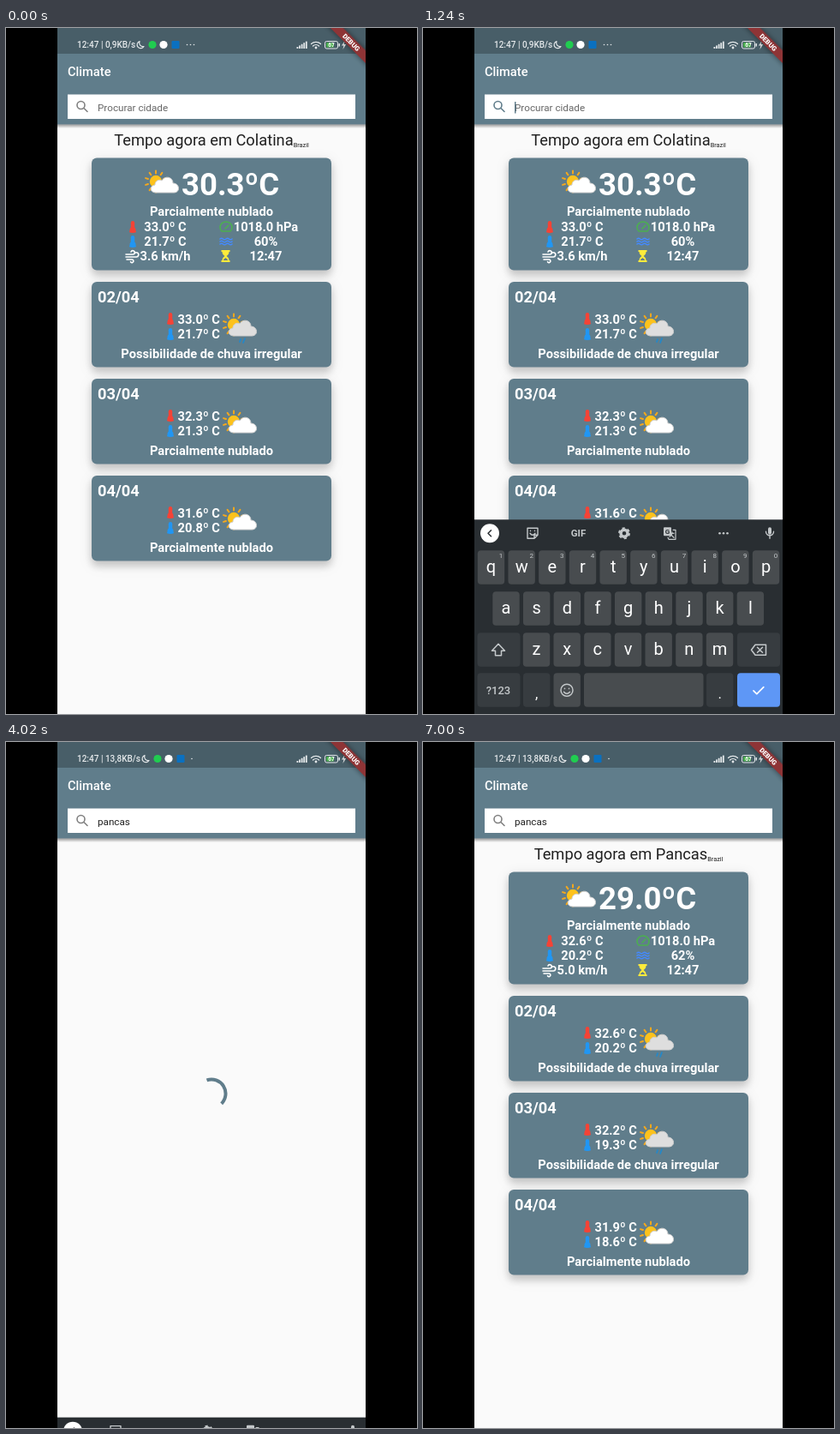
An HTML page that plays this animation: 480 px wide and 800 px high, repeating every 7050 ms.

```html
<!DOCTYPE html>
<html lang="pt">
<head>
<meta charset="utf-8">
<title>Climate</title>
<style>
html, body { margin: 0; width: 100%; height: 100%; overflow: hidden; background: #000; }
svg { display: block; width: 480px; height: 800px; font-family: Roboto, sans-serif; }
text { white-space: pre; }
.card { fill: #607d8b; filter: drop-shadow(0 6px 5px rgba(0, 0, 0, .16)) drop-shadow(0 3px 7px rgba(0, 0, 0, .1)); }
.bold { fill: #fff; font-weight: 700; font-size: 14.66px; }
.mid { text-anchor: middle; }
.line { fill: none; stroke-linecap: round; stroke-linejoin: round; }
.key { font-size: 20px; fill: #fff; text-anchor: middle; }
</style>
</head>
<body>
<svg viewBox="0 0 480 800">
  <defs>
    <clipPath id="phone"><rect x="60" width="360" height="800"/></clipPath>
    <linearGradient id="barShade" x2="0" y2="1">
      <stop stop-opacity=".38"/><stop offset="1" stop-opacity="0"/>
    </linearGradient>
  </defs>
  <rect width="480" height="800"/>
  <g clip-path="url(#phone)">
    <rect x="60" width="360" height="800" fill="#fafafa"/>
    <g id="body"></g>
    <g id="spinner"><path class="line" stroke="#607d8b" stroke-width="4" style="stroke-linecap:butt"/></g>
    <rect x="60" y="30" width="360" height="82.5" fill="#607d8b"/>
    <rect x="60" y="112.5" width="360" height="4.5" fill="url(#barShade)"/>
    <rect x="60" width="360" height="30" fill="#485e68"/>
    <text x="72" y="56" font-size="14.66" font-weight="500" fill="#fff">Climate</text>
    <rect x="72" y="77.5" width="336" height="28.5" fill="#fff"/>
    <g id="search"></g>
    <g id="status"></g>
    <g id="keyboard"></g>
    <g transform="translate(420 0) rotate(45)">
      <rect x="-50" y="18.5" width="100" height="10.5" fill="#8e3436" style="filter:drop-shadow(0 0 3px rgba(0,0,0,.5))"/>
      <text class="mid" y="26.5" font-size="7.8" font-weight="900" fill="#fff">DEBUG</text>
    </g>
  </g>
</svg>
<script>
const LOOP = 7050;
const FOCUS = 850, KEYS_IN = 1000, SUBMIT = 3860, LOADING = 3900, LOADED = 4500;
const QUERY = 'pancas';
const FIRST_PRESS = 2400, PRESS_EVERY = 200, PRESS_HOLD = 110;
const KEYS_HEIGHT = 227;
const RAIN = 'Possibilidade de chuva irregular', CLOUDY = 'Parcialmente nublado';
const RED = '#f44336', BLUE = '#2196f3', PRIMARY = '#607d8b';

const PLACES = {
  colatina: {
    city: 'Colatina', temp: '30.3', max: '33.0', min: '21.7', wind: '3.6', humidity: '60',
    days: [['33.0', '21.7', RAIN], ['32.3', '21.3', CLOUDY], ['31.6', '20.8', CLOUDY]]
  },
  pancas: {
    city: 'Pancas', temp: '29.0', max: '32.6', min: '20.2', wind: '5.0', humidity: '62',
    days: [['32.6', '20.2', RAIN], ['32.2', '19.3', RAIN], ['31.9', '18.6', CLOUDY]]
  }
};
const SUGGESTIONS = [
  ['p', 'para', 'por'], ['pa', 'para', 'pai'], ['pan', 'panela', 'pano'],
  ['panc', 'pancada', 'pancadas'], ['panca', 'pancada', 'pancadas'], ['pancas', 'pancadão', 'pancada']
];

const $ = id => document.getElementById(id);
const clamp = x => Math.max(0, Math.min(1, x));
const easeOut = x => 1 - (1 - x) ** 2;
const at = (x, y, content) => `<g transform="translate(${x} ${y})">${content}</g>`;
const line = (d, color, width = 1.5) => `<path class="line" d="${d}" stroke="${color}" stroke-width="${width}"/>`;
const rect = (x, y, w, h, fill, r = 0) => `<rect x="${x}" y="${y}" width="${w}" height="${h}" rx="${r}" fill="${fill}"/>`;
const circle = (x, y, r, fill) => `<circle cx="${x}" cy="${y}" r="${r}" fill="${fill}"/>`;
const label = (x, y, s, cls = 'bold', extra = '') => `<text x="${x}" y="${y}" class="${cls}" ${extra}>${s}</text>`;

// Replace a group's content only when it changes.
const shown = {};
function put(id, content) {
  if (shown[id] !== content) $(id).innerHTML = shown[id] = content;
}

function thermometer(x, y, color) {
  return at(x, y, rect(-2.2, -7, 4.4, 11, color, 2.2) + circle(0, 3.4, 3.5, color) + rect(-4, 4.6, 8, 2, color, 1));
}

function weatherIcon(x, y, rain) {
  let rays = '';
  for (let i = 0; i < 10; i++) {
    const a = i * Math.PI / 5 - Math.PI / 2, c = Math.cos(a), s = Math.sin(a);
    rays += `M${9.5 * c} ${9.5 * s}L${12.5 * c} ${12.5 * s}`;
  }
  const cloud = 'M0 13C-7 13-8 5-1 4C-1-1 4-3 7-1C10-7 20-6 20 2C28 2 29 13 21 13Z';
  return at(x, y, line(rays, '#f5a81c', 2) + circle(0, 0, 7.2, '#fdc21c') +
    `<path d="${cloud}" fill="${rain ? '#dedede' : '#fff'}" stroke="#d0d0d0" stroke-width="1"/>` +
    (rain ? line('M8 17l-1 3M13 16l-2 5', '#2488c8', 1.8) : ''));
}

function metricIcons() {
  const wave = y => `M-7 ${y}q1.75-1.4 3.5 0t3.5 0t3.5 0t3.5 0`;
  return thermometer(148, 232, RED) + thermometer(148, 249, BLUE) +
    at(148, 266, line('M-8-2h8a2.2 2.2 0 1 0-2-3M-8 1H4a2.6 2.6 0 1 0-2-4M-7 4h6a1.8 1.8 0 1 1-1.5 2.6', '#fff', 1.6)) +
    at(257, 232, line('M-5 5A7 6.5 0 1 1 5 5ZM-1 2L3-2', '#4caf50', 1.6)) +
    at(257, 249, line(wave(-3) + wave(0) + wave(3), '#448aff', 1.6)) +
    at(256.5, 266, '<path d="M-5-7H5v2H4c0 3-2 4-3 5c1 1 3 2 3 5h1v2H-5V5h1c0-3 2-4 3-5c-1-1-3-2-3-5h-1z" fill="#ffeb3b"/>' +
      `<path d="M-2.5 5c0-2 2-2 2.5-3c.5 1 2.5 1 2.5 3z" fill="${PRIMARY}"/>`);
}

function dayCard([max, min, text], i) {
  return at(0, 296 + 113 * i, '<rect class="card" x="100" width="280" height="99.5" rx="6"/>' +
    label(107, 24.3, `0${i + 2}/04`, 'bold', 'style="font-size:18.3px"') +
    thermometer(192, 43, RED) + thermometer(192, 61, BLUE) +
    label(200.5, 49, `${max}º C`) + label(200.5, 66, `${min}º C`) +
    weatherIcon(266, 50, text === RAIN) + label(240, 89, text, 'bold mid'));
}

function weather(p) {
  const metric = (x, row, s) => label(x, 237 + 17 * row, s, 'bold mid');
  return label(240, 137, `Tempo agora em ${p.city}<tspan font-size="7.33" dy="1.5">Brazil</tspan>`, 'mid', 'font-size="18.3" fill="#202020"') +
    '<rect class="card" x="100" y="151.5" width="280" height="131" rx="6"/>' +
    weatherIcon(175, 179, false) +
    label(205, 194.5, `${p.temp}ºC`, 'bold', 'style="font-size:36.6px"') +
    label(240, 219, CLOUDY, 'bold mid') + metricIcons() +
    metric(186, 0, `${p.max}º C`) + metric(186, 1, `${p.min}º C`) + metric(186, 2, `${p.wind} km/h`) +
    metric(303.5, 0, '1018.0 hPa') + metric(303.5, 1, `${p.humidity}%`) + metric(303.5, 2, '12:47') +
    p.days.map(dayCard).join('');
}

function statusBar(fast) {
  const x = fast ? 6 : 0, ink = '#e4e8ea';
  let out = label(83, 23.3, `12:47 | ${fast ? '13,8' : '0,9'}KB/s`, '', `font-size="10" font-weight="500" fill="${ink}"`);
  out += at(157 + x, 19.5, line('M-1-4a4.2 4.2 0 1 0 5 6a4.4 4.4 0 0 1-5-6z', ink, 1.2));
  out += circle(171 + x, 19.5, 4.6, '#20cc50') + circle(184 + x, 19.5, 4.6, '#fff') + rect(193.5 + x, 15, 9, 9, '#0a70c0', 1);
  for (let i = 0; i < (fast ? 1 : 3); i++) out += circle((fast ? 217 : 211.5) + 4 * i, 19.5, .8, ink);
  for (let i = 0; i < 5; i++) out += rect(339.5 + 2.6 * i, 22 - 1.6 * i, 1.8, 2 + 1.6 * i, ink);
  out += at(362, 24, line('M-5.5-5.5a8 8 0 0 1 11 0M-3.5-3a5 5 0 0 1 7 0', ink, 1.3) + circle(0, -1, 1.4, ink));
  out += `<rect x="372.5" y="15.5" width="15" height="8.5" rx="2" fill="none" stroke="${ink}"/>` + rect(374, 17, 9, 5.5, '#4caf50', 1) + rect(388.5, 18, 1.5, 3.5, ink);
  out += label(380, 22.3, '67', 'mid', 'font-size="6.5" font-weight="700" fill="#fff"');
  return out + `<path d="M395.5 15l-3.5 5.5h2.4l-1 4.5l3.8-6h-2.5z" fill="${ink}"/>`;
}

const pen = document.createElement('canvas').getContext('2d');
function measure(s) {
  pen.font = '11.7px Roboto, sans-serif';
  return pen.measureText(s).width;
}

function searchField(typed, focused, caret) {
  const width = measure(typed);
  return at(89, 91.5, line('M2.2 2.2L6 6M3-1.5a4.5 4.5 0 1 1-9 0a4.5 4.5 0 1 1 9 0z', focused ? PRIMARY : '#808080', 1.6)) +
    label(107, 96.5, typed || 'Procurar cidade', '', `font-size="11.7" fill="${typed ? '#202020' : '#686868'}"`) +
    (typed && focused ? rect(107, 98, width, 1, '#202020') : '') +
    (caret ? rect(107 + width, 86, 1.5, 13.5, PRIMARY) : '');
}

// Keyboard, with its origin at the top of the toolbar.
const ROWS = [['qwertyuiop', 79.5, 36], ['asdfghjkl', 97, 84], ['zxcvbnm', 132.5, 132]];
const BOARD = '#292e32', DARK_KEY = '#373c40', KEY = '#484c4f', SOFT = '#c4c8ca';

function toolbar(count) {
  let out = circle(78, 16, 11, '#fff') + line(count ? 'M76.5 12.5l3.5 3.5l-3.5 3.5' : 'M79.5 12.5l-3.5 3.5l3.5 3.5', BOARD);
  if (count) {
    SUGGESTIONS[count - 1].forEach((s, i) => out += label(135.5 + 103.5 * i, 21, s, 'mid', `font-size="13.6" fill="${SOFT}"`));
    out += rect(185, 9, 1, 15, KEY) + rect(294, 9, 1, 15, KEY);
  } else {
    out += at(128, 16, line('M-6-6H6V2L2 6H-6ZM6 2H2V6M-3 0q3 4 6 0M-2.5-3v.3M2.5-3v.3', SOFT, 1.4));
    out += label(181.5, 20, 'GIF', 'mid', `font-size="11.5" font-weight="700" fill="${SOFT}"`);
    out += at(235, 16, `<circle r="4" fill="none" stroke="${SOFT}" stroke-width="3.4"/><circle r="6" fill="none" stroke="${SOFT}" stroke-width="2" stroke-dasharray="3.14 3.14"/>`);
    out += at(288, 16, rect(-7, -7, 9, 10, SOFT, 1) + label(-2.5, 1, 'G', 'mid', `font-size="8" font-weight="700" fill="${BOARD}"`) +
      line('M4-4H7V7H-1L-2 5M1 0H5M3-1.5V0Q2 3 0 4M2 2L5 5', SOFT, 1.2));
    for (let i = -1; i < 2; i++) out += circle(351 + 4.5 * i, 16, 1.3, SOFT);
  }
  return out + at(405, 15, rect(-2, -6, 4, 8.5, SOFT, 2) + line('M-4.5-1a4.5 4.5 0 0 0 9 0M0 4v3', SOFT, 1.4));
}

function keyboard(count, pressed) {
  let out = rect(60, 0, 360, KEYS_HEIGHT + 2, BOARD) + toolbar(count), popup = '';
  for (const [letters, x0, y] of ROWS) {
    [...letters].forEach((c, i) => {
      const x = x0 + 35.67 * i;
      out += rect(x - 15.7, y, 31.4, 39.5, KEY, 4) + label(x, y + 26, c, 'key');
      if (y === 36) out += label(x + 11.5, y + 9, (i + 1) % 10, 'mid', `font-size="8" fill="${SOFT}"`);
      if (c === pressed) {
        popup = rect(x - 15.5, y - 52, 31, 91.5, DARK_KEY, 4) + label(x, y - 24, c, 'key');
        for (let k = 0; k < 3; k++) popup += circle(x + 6.5 + 2.5 * k, y - 15, .7, SOFT);
      }
    });
  }
  const special = [[63.5, 132, 50], [367, 132, 50], [63.5, 179, 50], [117, 179, 31.4], [331, 179, 31.4]];
  out += special.map(([x, y, w]) => rect(x, y, w, 39.5, DARK_KEY, 4)).join('');
  out += rect(152.5, 179, 31.4, 39.5, KEY, 4) + rect(188, 179, 139.5, 39.5, KEY, 4) + rect(367, 179, 50, 39.5, '#5e97f6', 4);
  out += at(88, 152, line('M0-7L7.5 1H3.5V6.5H-3.5V1H-7.5Z', SOFT));
  out += at(392, 152, line('M-8.5 0L-4-6H8.5V6H-4ZM-1.5-3l6 6M4.5-3l-6 6', SOFT));
  out += label(88, 204, '?123', 'mid', `font-size="13" font-weight="500" fill="${SOFT}"`);
  out += label(132.7, 209, ',', 'key', 'style="font-size:17px"') + label(346.7, 209, '.', 'key', 'style="font-size:17px"');
  out += at(168, 199, line('M7 0A7 7 0 1 1-7 0A7 7 0 1 1 7 0ZM-3.5 2q3.5 4 7 0M-2.5-2v.3M2.5-2v.3', SOFT));
  out += line('M386 199.5l3.8 3.8l8-8', '#fff', 1.7);
  return out + popup;
}

// Standard material curve, cubic-bezier(.4, 0, .2, 1).
function materialEase(x) {
  let lo = 0, hi = 1;
  for (let i = 0; i < 20; i++) {
    const u = (lo + hi) / 2;
    if (1.2 * u * (1 - u) ** 2 + .6 * u * u * (1 - u) + u ** 3 < x) lo = u; else hi = u;
  }
  return 3 * lo * lo - 2 * lo ** 3;
}

function spinnerPath(ms) {
  const cycle = ms / 1333 % 1;
  const head = materialEase(clamp(cycle * 2)), tail = materialEase(clamp(cycle * 2 - 1));
  const start = -67 + tail * 270 + ms / 2222 * 360 + cycle * 90;
  const sweep = Math.max((head - tail) * 270, .1);
  const point = deg => {
    const a = deg * Math.PI / 180;
    return `${240 + 16.5 * Math.cos(a)} ${410 + 16.5 * Math.sin(a)}`;
  };
  return `M${point(start)}A16.5 16.5 0 ${sweep > 180 ? 1 : 0} 1 ${point(start + sweep)}`;
}

const pages = { colatina: weather(PLACES.colatina), pancas: weather(PLACES.pancas) };

function draw(t) {
  const typing = t - FIRST_PRESS;
  const press = Math.floor(typing / PRESS_EVERY);
  const pressed = typing >= 0 && typing % PRESS_EVERY < PRESS_HOLD ? QUERY[press] : undefined;
  const count = Math.max(0, Math.min(QUERY.length, Math.floor((typing - PRESS_HOLD) / PRESS_EVERY) + 1));
  const lastEdit = count ? FIRST_PRESS + (count - 1) * PRESS_EVERY + PRESS_HOLD : FOCUS;
  const focused = t >= FOCUS && t < SUBMIT;
  const caret = focused && Math.floor((t - lastEdit) / 500) % 2 === 0;
  const loading = t >= LOADING && t < LOADED;

  put('body', loading ? '' : t < LOADING ? pages.colatina : pages.pancas);
  put('search', searchField(QUERY.slice(0, count), focused, caret));
  put('status', statusBar(t >= 3000));

  const open = easeOut(clamp((t - KEYS_IN) / 250)) - easeOut(clamp((t - SUBMIT) / 210));
  put('keyboard', open > 0 ? keyboard(focused ? count : 0, pressed) : '');
  $('keyboard').setAttribute('transform', `translate(0 ${800 - KEYS_HEIGHT * open})`);

  $('spinner').style.display = loading ? '' : 'none';
  if (loading) $('spinner').firstElementChild.setAttribute('d', spinnerPath(t - LOADING + 760));
}

const began = performance.now();
function tick() {
  draw((performance.now() - began) % LOOP);
  requestAnimationFrame(tick);
}
tick();
</script>
</body>
</html>
```
